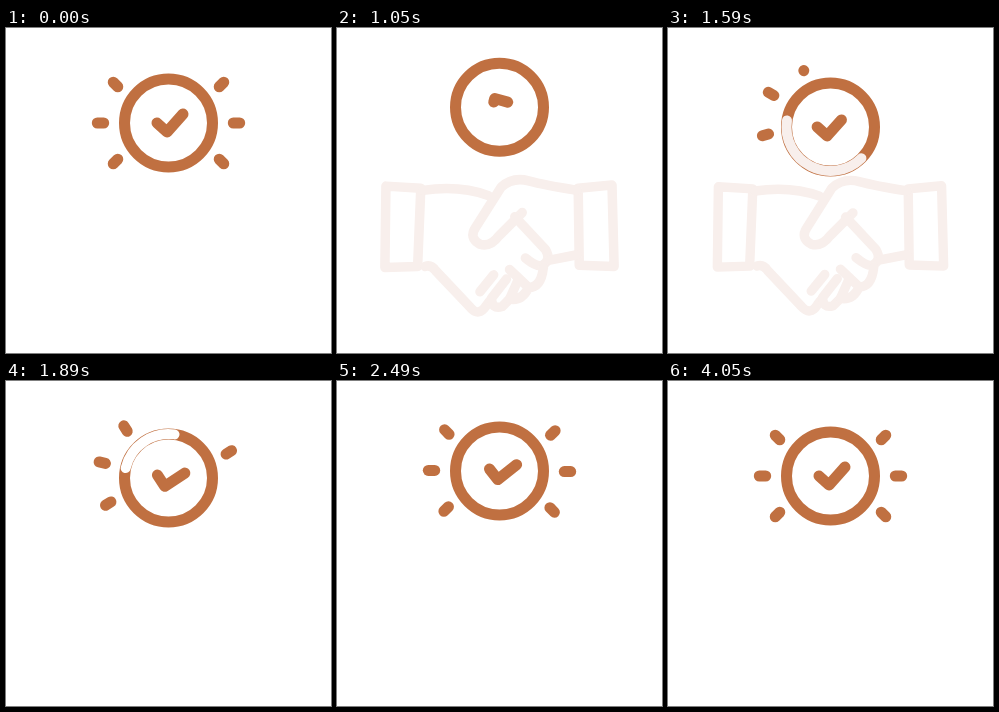
Recreate the animation shown at these times as an HTML page. Size 325 px wide and 325 px high, loop 5400 ms.

```html
<!DOCTYPE html>
<html lang="en">
<head>
<meta charset="utf-8">
<title>Deal</title>
<style>
  html, body { margin: 0; width: 100%; height: 100%; overflow: hidden; background: #fff; }
  svg { display: block; width: 100%; height: 100%; }
  svg * { fill: none; stroke-linecap: round; stroke-linejoin: round; }
  #badge { stroke: #c07041; stroke-width: 11; }
  #sweep { stroke-width: 10; }
  #hands { stroke: #f8efec; stroke-width: 9; }
</style>
</head>
<body>
<svg viewBox="0 0 325 325">
  <g id="hands">
    <path d="M55 161L88 163L85 237L54 238Z M237 163L269 160L271 237L238 236Z"/>
    <path d="M90 165Q125 160 152 170"/>
    <path d="M236 165Q205 160 190 156Q175 152 164 162L140 200Q133 210 144 216Q154 219 162 208L184 186"/>
    <path d="M177 190L206 221Q212 231 203 236Q198 238 187 229"/>
    <path d="M236 226L210 231"/>
    <path d="M92 237Q98 235 102 241L135 276Q143 285 150 274L153 270"/>
    <path d="M157 245L144 261M169 249L155 267Q155 278 165 275L171 269"/>
    <path d="M172 240L190 257Q202 257 204 238M180 250L172 268Q184 270 190 257"/>
  </g>
  <g id="badge">
    <circle r="44"/>
    <path id="sweep"/>
    <g id="rays"></g>
    <path id="check"/>
  </g>
</svg>
<script>
const LOOP = 5400;
const $ = id => document.getElementById(id);
const clamp = v => Math.min(1, Math.max(0, v));
const ease = p => p * p * (3 - 2 * p);

// Each track is a list of [time, value] steps, eased from one to the next.
const tracks = {
  height: [[30, 95], [620, 71], [660, 73], [1150, 80], [1320, 92], [1560, 99], [1890, 97],
    [2280, 69], [2490, 90], [2700, 105.5], [3040, 92], [3180, 95], [3420, 96], [3700, 94.5], [3990, 95]],
  spin: [[30, 0], [660, -15], [760, -17], [1320, 305], [1720, 378], [1890, 375],
    [2150, 363], [2490, 370], [3180, 354], [3640, 362], [4050, 360]],
  shift: [[700, 0], [1320, -3.5], [1890, 0], [2490, 1.3], [3180, -1.3], [3700, 0]],
  checkLength: [[150, 1], [640, .37], [900, .37], [1320, .66], [1700, 1]],
  rayTurn: [[30, 0], [660, -14], [850, -25], [1000, 43], [1320, 43], [1890, 13],
    [2490, .5], [3180, -1.5], [3700, 0]],
  sweepEnd: [[1050, 0], [1320, 117], [1780, 359.9]],
  sweepStart: [[1320, 0], [1890, 275], [2060, 359.9]],
  handScale: [[900, 1.08], [1320, 1], [1790, 1.07]]
};

function at(name, t) {
  const steps = tracks[name];
  const next = steps.findIndex(s => s[0] > t);
  if (next === 0) return steps[0][1];
  if (next < 0) return steps[steps.length - 1][1];
  const [t0, a] = steps[next - 1], [t1, b] = steps[next];
  return a + (b - a) * ease((t - t0) / (t1 - t0));
}

// Rays in clockwise order: position angle, tilt, hide time, show time.
const rays = [
  [144, 135, 330, 1290], [180, 180, 400, 1440], [216, 225, 470, 1590],
  [-36, -45, 590, 1730], [0, 0, 690, 1920], [36, 45, 730, 2070]
].map(([angle, tilt, hide, show]) => {
  const line = document.createElementNS("http://www.w3.org/2000/svg", "line");
  const radius = angle % 180 ? 65.5 : 68;
  const rad = angle * Math.PI / 180;
  line.setAttribute("x1", -3.2);
  line.setAttribute("transform",
    `translate(${radius * Math.cos(rad)} ${radius * Math.sin(rad)}) rotate(${tilt})`);
  $("rays").append(line);
  return { line, hide, show };
});

function checkPath(part) {
  const total = 37.5, first = 13.5;
  const p = clamp((part * total - first) / (total - first));
  return `M-11.5 0L-1.5 9L${-1.5 + 16 * p} ${9 - 18 * p}`;
}

function arcPath(from, to) {
  const point = deg => {
    const a = (deg - 82) * Math.PI / 180;
    return `${44 * Math.cos(a)} ${44 * Math.sin(a)}`;
  };
  return `M${point(from)}A44 44 0 ${to - from > 180 ? 1 : 0} 1 ${point(to)}`;
}

function draw(t) {
  $("badge").setAttribute("transform", `translate(162.5 ${at("height", t)})`);
  $("check").setAttribute("transform", `translate(${at("shift", t)} 0) rotate(${at("spin", t)})`);
  $("check").setAttribute("d", checkPath(at("checkLength", t)));

  $("rays").setAttribute("transform", `rotate(${at("rayTurn", t)})`);
  for (const { line, hide, show } of rays) {
    const size = t < 1100 ? 1 - clamp((t - hide) / 130) : clamp((t - show) / 150);
    line.setAttribute("x2", -3.2 + 6.4 * size);
    line.style.display = size ? "" : "none";
  }

  const from = at("sweepStart", t), to = at("sweepEnd", t);
  const tinted = t >= 900 && t < 1800;
  $("sweep").style.display = to - from > .1 ? "" : "none";
  $("sweep").style.stroke = tinted ? "#f8efec" : "#fff";
  $("sweep").setAttribute("d", arcPath(from, to));

  $("hands").style.display = tinted ? "" : "none";
  $("hands").setAttribute("transform",
    `translate(162.5 212) scale(${at("handScale", t)}) translate(-162.5 -212)`);
}

const start = performance.now();
function tick(now) {
  draw(Math.max(0, now - start) % LOOP);
  requestAnimationFrame(tick);
}
draw(0);
requestAnimationFrame(tick);
</script>
</body>
</html>
```
